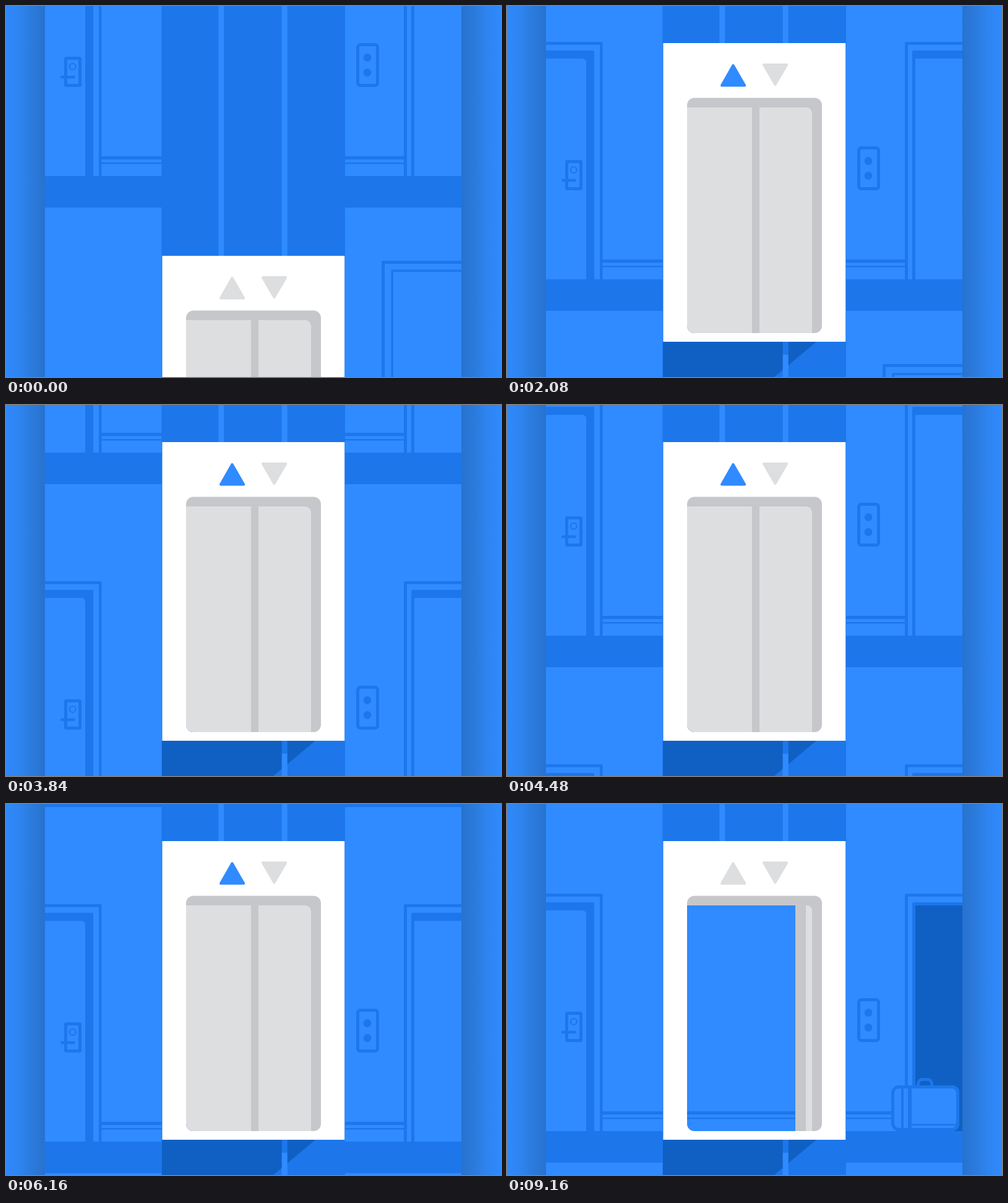
An HTML page with a canvas that plays this animation: 800x600 px, repeating every 9.2 s.

```html
<!DOCTYPE html>
<html>
<head>
<meta charset="utf-8">
<title>Elevator</title>
<style>
  html, body { margin: 0; width: 100%; height: 100%; overflow: hidden; background: #2f8bff; }
  canvas { display: block; }
</style>
</head>
<body>
<canvas id="stage" width="800" height="600"></canvas>
<script>
const ctx = document.getElementById('stage').getContext('2d');
const LIGHT = '#2f8bff', MID = '#1d77ea', DARK = '#1060c4';
const PANEL = '#dddee0', METAL = '#c6c7ca';
const LOOP = 9200, STEP = 40;
const FLOOR_GAP = 592, FLOORS = 5, FIRST_FLOOR = 275;
const RISE = 344, CRUISE = 0.4653, RAMP = 1333, POWER = 3.8;
// [time, scroll] while travelling between floors
const TRACK = [[2080, 167], [3840, 986], [5120, 1578], [6160, 2047], [7240, 2541]];
const END_SCROLL = 2622, BRAKE = 443;

function box(color, left, top, right, bottom, radius = 0) {
  ctx.fillStyle = color;
  ctx.beginPath();
  ctx.roundRect(left, top, right - left, bottom - top, radius);
  ctx.fill();
}

function outline(width, left, top, right, bottom, radius) {
  const h = width / 2;
  ctx.lineWidth = width;
  ctx.strokeStyle = MID;
  ctx.beginPath();
  ctx.roundRect(left + h, top + h, right - left - width, bottom - top - width, radius);
  ctx.stroke();
}

function dot(x, y, r, stroke) {
  ctx.beginPath();
  ctx.arc(x, y, r, 0, Math.PI * 2);
  if (stroke) { ctx.lineWidth = stroke; ctx.strokeStyle = MID; ctx.stroke(); }
  else { ctx.fillStyle = MID; ctx.fill(); }
}

function polygon(color, points, round = 0) {
  ctx.fillStyle = ctx.strokeStyle = color;
  ctx.lineWidth = round;
  ctx.lineJoin = 'round';
  ctx.beginPath();
  points.forEach(([x, y]) => ctx.lineTo(x, y));
  ctx.closePath();
  ctx.fill();
  if (round) ctx.stroke();
}

function at(x, y, draw) {
  ctx.save();
  ctx.translate(x, y);
  draw();
  ctx.restore();
}

// Distance the car has climbed during the launch
function climb(t) {
  return t < RAMP
    ? CRUISE * RAMP / POWER * (t / RAMP) ** POWER
    : CRUISE * (t - RAMP * (1 - 1 / POWER));
}

function scrollAt(t) {
  if (t < TRACK[0][0]) return Math.max(0, climb(t) - RISE);
  for (let i = 1; i < TRACK.length; i++) {
    const [t0, s0] = TRACK[i - 1], [t1, s1] = TRACK[i];
    if (t < t1) return s0 + (s1 - s0) * (t - t0) / (t1 - t0);
  }
  const left = Math.max(0, 1 - (t - 7240) / BRAKE);
  return END_SCROLL - 81 * left ** 2.5;
}

function baseboard(left, right) {
  box(MID, left, -32, right, -26.7);
  box(MID, left, -22, right, -19.5);
}

function suitcase() {
  ctx.lineWidth = 5;
  ctx.strokeStyle = MID;
  ctx.beginPath();
  ctx.roundRect(664.5, -83.5, 22, 20, 7);
  ctx.stroke();
  box(LIGHT, 621, -74, 731, 0, 12);
  outline(5, 621, -74, 731, 0, 10);
  box(MID, 637, -72, 641, -2);
  box(MID, 648, -72, 654, -2);
  box(MID, 654, -11.5, 728, -9);
}

// One hallway; y = 0 is the top of its slab
function hallway(isLast) {
  box(MID, 63, 0, 252, 51);
  box(MID, 548, 0, 736, 51);
  baseboard(154, 252);
  baseboard(548, 644);

  box(MID, 50, -384, 154.5, 0, [0, 2, 0, 0]);
  box(LIGHT, 50, -379.3, 150, 0);
  box(MID, 50, -370, 141, 0, [0, 2, 0, 0]);
  box(LIGHT, 50, -357, 128, 0, [0, 6, 0, 0]);
  outline(5, 94, -193, 122, -144, 1);
  dot(107.7, -177, 5, 2.2);
  box(MID, 88, -162.3, 112, -157.7, 2.3);

  box(MID, 643, -384, 750, 0, [2, 0, 0, 0]);
  box(LIGHT, 648, -379.3, 750, 0);
  box(MID, 655, -370, 750, 0, [2, 0, 0, 0]);
  box(isLast ? DARK : LIGHT, 660, isLast ? -365 : -357, 750, 0);
  outline(5, 566, -215, 603, -144, 4);
  dot(584, -191.5, 6.4);
  dot(584, -167.5, 6.4);
  if (isLast) suitcase();
}

function lobbyDoor() {
  box(MID, 607, 137, 750, 700, [2, 0, 0, 0]);
  box(LIGHT, 612, 142, 750, 700);
  box(MID, 622.5, 151.5, 750, 700);
  box(LIGHT, 626, 155, 750, 700);
}

function building(scroll) {
  box(LIGHT, 0, 0, 800, 600);
  at(0, FIRST_FLOOR + scroll, lobbyDoor);
  for (let i = 0; i < FLOORS; i++) {
    const y = FIRST_FLOOR + scroll - i * FLOOR_GAP;
    if (y > -60 && y < 1000) at(0, y, () => hallway(i === FLOORS - 1));
  }
  box(MID, 251.5, 0, 548, 600);
  box(LIGHT, 343.3, 0, 352.3, 600);
  box(LIGHT, 445.7, 0, 454.7, 600);
}

// A door leaf with a metal leading edge
function leaf(left, right, radius) {
  box(METAL, left - 12, 104, left + 2, 469);
  box(PANEL, left, 104, right, 469, radius);
}

// y = 0 is the top of the car
function car(isLit, open) {
  polygon(DARK, [[252, 483], [500, 483], [432, 540], [252, 540]]);
  box(MID, 445.7, 483, 454.7, 504);
  box(LIGHT, 445.7, 504, 454.7, 700);
  box('#fff', 252.5, 0, 547.2, 483);
  polygon(isLit ? LIGHT : PANEL, [[365.5, 36], [347, 68.4], [384.2, 68.4]], 4);
  polygon(PANEL, [[433.5, 67], [415, 35], [452.2, 35]], 4);

  box(METAL, 291, 88.5, 509, 469, 12);
  ctx.save();
  ctx.beginPath();
  ctx.roundRect(291, 104, 202, 365, [0, 8, 0, 12]);
  ctx.clip();
  box(LIGHT, 291, 104, 493, 469);
  at(0, 469, () => baseboard(291, 493));
  leaf(291 + 187 * open, 396 + 187 * open, 0);
  leaf(408 + 75 * open, 493 + 75 * open, 0);
  ctx.restore();
}

function sideColumns() {
  const shade = ctx.createLinearGradient(0, 0, 63, 0);
  shade.addColorStop(0, '#2f8afc');
  shade.addColorStop(0.35, '#2e84f0');
  shade.addColorStop(0.65, '#2b7bdd');
  shade.addColorStop(1, '#2772cf');
  const column = () => box(shade, 0, 0, 63, 600);
  column();
  ctx.save();
  ctx.translate(799, 0);
  ctx.scale(-1, 1);
  box(LIGHT, -1, 0, 1, 600);
  column();
  ctx.restore();
}

function frame(now) {
  const t = Math.floor(now % LOOP / STEP) * STEP;
  const s = Math.min(1, Math.max(0, (t - 7680) / 880));
  building(scrollAt(t));
  at(0, 404 - Math.min(RISE, climb(t)), () => car(t >= 200 && t < 9160, s * s * (3 - 2 * s)));
  sideColumns();
}

let start;
function tick(now) {
  start ??= now;
  frame(now - start);
  requestAnimationFrame(tick);
}
frame(0);
requestAnimationFrame(tick);
</script>
</body>
</html>
```
